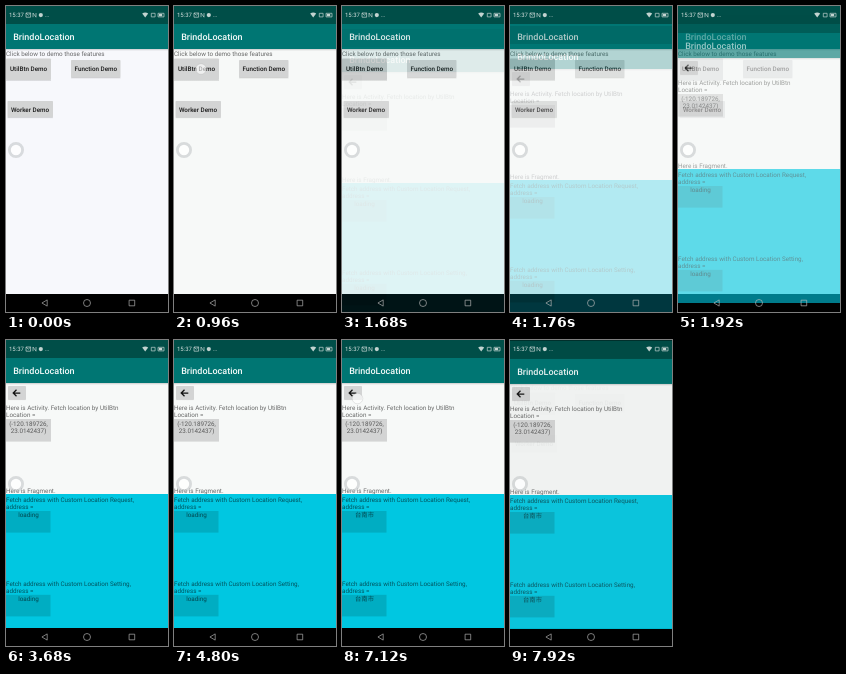
Recreate the animation shown at these times as an HTML page. Size 162x306 px, loop 8 s.

```html
<!DOCTYPE html>
<html lang="en">
<head>
<meta charset="utf-8">
<title>Location demo</title>
<style>
  html, body { margin: 0; width: 100%; height: 100%; overflow: hidden; background: #000; }
  svg { display: block; width: 100vw; height: 100vh; }
  text { font: 400 6.3px Roboto, sans-serif; fill: #000; fill-opacity: .58; text-rendering: geometricPrecision; }
  .title { font-size: 9px; font-weight: 500; fill: #f4fbfa; fill-opacity: 1; }
  .label { font-weight: 500; fill: #161616; fill-opacity: 1; text-anchor: middle; }
  .mid { text-anchor: middle; }
  .city { font-family: "Noto Sans CJK TC", "Noto Sans CJK", sans-serif; }
  .clock { font-size: 6px; fill: #d3e0de; fill-opacity: 1; }
  .icon { fill: none; stroke: #c2d3d0; stroke-width: .7; }
  .nav { fill: none; stroke: #bcbcbc; stroke-width: .65; }
  .btn { fill: #d3d4d4; }
  .btn-cyan { fill: #00adc2; }
  .touch { fill: #fff; fill-opacity: .62; stroke: #aaa; stroke-opacity: .55; stroke-width: .5; }
</style>
</head>
<body>
<svg viewBox="0 0 162 306">
  <defs>
    <linearGradient id="fade" x2="0" y2="1">
      <stop stop-color="#000" stop-opacity=".18"/>
      <stop offset="1" stop-color="#000" stop-opacity="0"/>
    </linearGradient>
    <g id="bars">
      <rect y="43" width="162" height="2" fill="url(#fade)"/>
      <rect width="162" height="18" fill="#004e48"/>
      <rect y="18" width="162" height="25" fill="#007673"/>
      <text class="title" x="7.2" y="34.2">BrindoLocation</text>
      <rect y="288" width="162" height="18"/>
    </g>
  </defs>

  <g id="home">
    <rect id="paper" width="162" height="288" fill="#f7f8fc"/>
    <text x="0" y="50">Click below to demo those features</text>
    <g id="homeButtons"></g>
    <rect id="ripple" y="52.5" width="45" height="21.5" opacity="0"/>
    <use href="#bars"/>
  </g>
  <rect id="dim" width="162" height="306" opacity="0"/>

  <g id="detail">
    <rect width="162" height="288" fill="#f7f9f8"/>
    <rect class="btn" x="2" y="46" width="18" height="13.6" rx=".8"/>
    <rect x="2" y="59.6" width="18" height="1" fill="url(#fade)"/>
    <rect id="backRipple" x="2" y="46" width="18" height="13.6" opacity="0"/>
    <path d="M14.3 53H7.4M10.5 49.7L7.2 53l3.3 3.3" fill="none" stroke="#111" stroke-width="1.25"/>
    <text x="0" y="69.7">Here is Activity. Fetch location by UtilBtn</text>
    <text x="0" y="77.1">Location =</text>
    <rect class="btn" y="79" width="45" height="22.6"/>
    <g id="coords">
      <text class="mid" x="22.5" y="85.5">(-120.189726,</text>
      <text class="mid" x="22.5" y="93">23.0142437)</text>
    </g>
    <text x="0" y="153.3">Here is Fragment.</text>
    <rect y="154" width="162" height="134" fill="#00c7e1"/>
    <g id="fetches"></g>
    <use href="#bars"/>
  </g>

  <g id="system">
    <text class="clock" x="3" y="11.3">15:37</text>
    <path class="icon" d="M20 7h4.6v4.2H20zl2.3 2.2L24.6 7M27 7v4.2M27 7l3 4.2V7"/>
    <circle cx="34.8" cy="9.1" r="2.1" fill="#c2d3d0"/>
    <text class="clock" x="39" y="11">…</text>
    <path d="M136.2 7.6q3-2 6 0l-3 3.8z" fill="#c2d3d0"/>
    <path class="icon" d="M145.3 7.3h3.8v3.6h-3.8zM152 7.3h6v3.6h-6z"/>
    <rect x="152.8" y="8" width="3.4" height="2.2" fill="#c2d3d0"/>
    <path class="nav" d="M41.2 293.9v6.2L35.9 297zM123.1 294.2h5.6v5.6h-5.6z"/>
    <circle class="nav" cx="81" cy="297" r="3.5"/>
    <circle cx="10" cy="144" r="5.2" fill="#fff" fill-opacity=".75"/>
    <circle cx="10" cy="144" r="6.6" fill="none" stroke="#b9bdc0" stroke-opacity=".5" stroke-width="2.8"/>
    <circle id="tapOpen" class="touch" cx="27" cy="63" r="5.3"/>
    <circle id="tapBack" class="touch" cx="15.5" cy="58.5" r="5.3"/>
  </g>
</svg>
<script>
const LOOP = 8000;
const $ = id => document.getElementById(id);

// Each step holds its value until the next one.
function hold(el, steps) {
  const frames = steps.map(([t, style]) => ({ offset: t / LOOP, easing: 'steps(1, end)', ...style }));
  frames.push({ ...frames[frames.length - 1], offset: 1 });
  el.animate(frames, { duration: LOOP, iterations: Infinity });
}
const fade = (el, steps) => hold(el, steps.map(([t, opacity]) => [t, { opacity }]));
const slide = (el, steps) => hold(el, steps.map(([t, opacity, y]) =>
  [t, { opacity, transform: `translateY(${y}px)` }]));

const button = (x, y, w, h, label, tx, ty) => `
  <rect class="btn" x="${x}" y="${y}" width="${w}" height="${h}" rx=".8"/>
  <rect x="${x}" y="${y + h}" width="${w}" height="1.4" fill="url(#fade)"/>
  <text class="label" x="${tx}" y="${ty}">${label}</text>`;

$('homeButtons').innerHTML =
  button(0, 52.5, 45, 21.5, 'UtilBtn Demo', 22.6, 65.1) +
  button(65, 54, 49.5, 17.5, 'Function Demo', 89.8, 65) +
  button(1.5, 95, 45.5, 16.3, 'Worker Demo', 24, 105.6);

const fetchRow = (y, kind) => `
  <text x="0" y="${y}">Fetch address with Custom Location ${kind},</text>
  <text x="0" y="${y + 7.4}">address =</text>
  <rect class="btn-cyan" y="${y + 9}" width="44.5" height="21.6"/>
  <text class="mid wait" x="22.5" y="${y + 15.4}">loading</text>
  <text class="mid city" x="22.5" y="${y + 15.4}">台南市</text>`;

$('fetches').innerHTML = fetchRow(162, 'Request') + fetchRow(245.8, 'Setting');

hold($('paper'), [[0, { fill: '#f7f8fc' }], [560, { fill: '#f7f9f8' }]]);

fade($('tapOpen'), [[0, 0], [960, 1], [1280, .5], [1360, 0]]);
fade($('ripple'), [[0, 0], [1200, .04], [1280, .08], [1360, .11], [1520, .09], [1680, .05], [1920, 0]]);
fade($('tapBack'), [[0, 0], [7120, 1], [7600, .5], [7680, 0]]);
fade($('backRipple'), [[0, 0], [7600, .1], [7680, .14], [7760, .08], [7840, 0]]);
fade($('coords'), [[0, 0], [1920, 1]]);
fade($('dim'), [[0, 0], [7600, .4]]);

// Opacity and downward offset of the second screen.
slide($('detail'), [
  [0, 0, 24], [1680, .1, 23], [1760, .28, 20], [1920, .62, 9], [2000, .85, 4],
  [2080, 1, 1.8], [2160, 1, .6], [2240, 1, 0], [7840, .98, .5], [7920, .93, 1]
]);

document.querySelectorAll('.wait').forEach(el => fade(el, [[0, 1], [5600, 0]]));
document.querySelectorAll('.city').forEach(el => fade(el, [[0, 0], [5600, 1]]));
</script>
</body>
</html>
```
